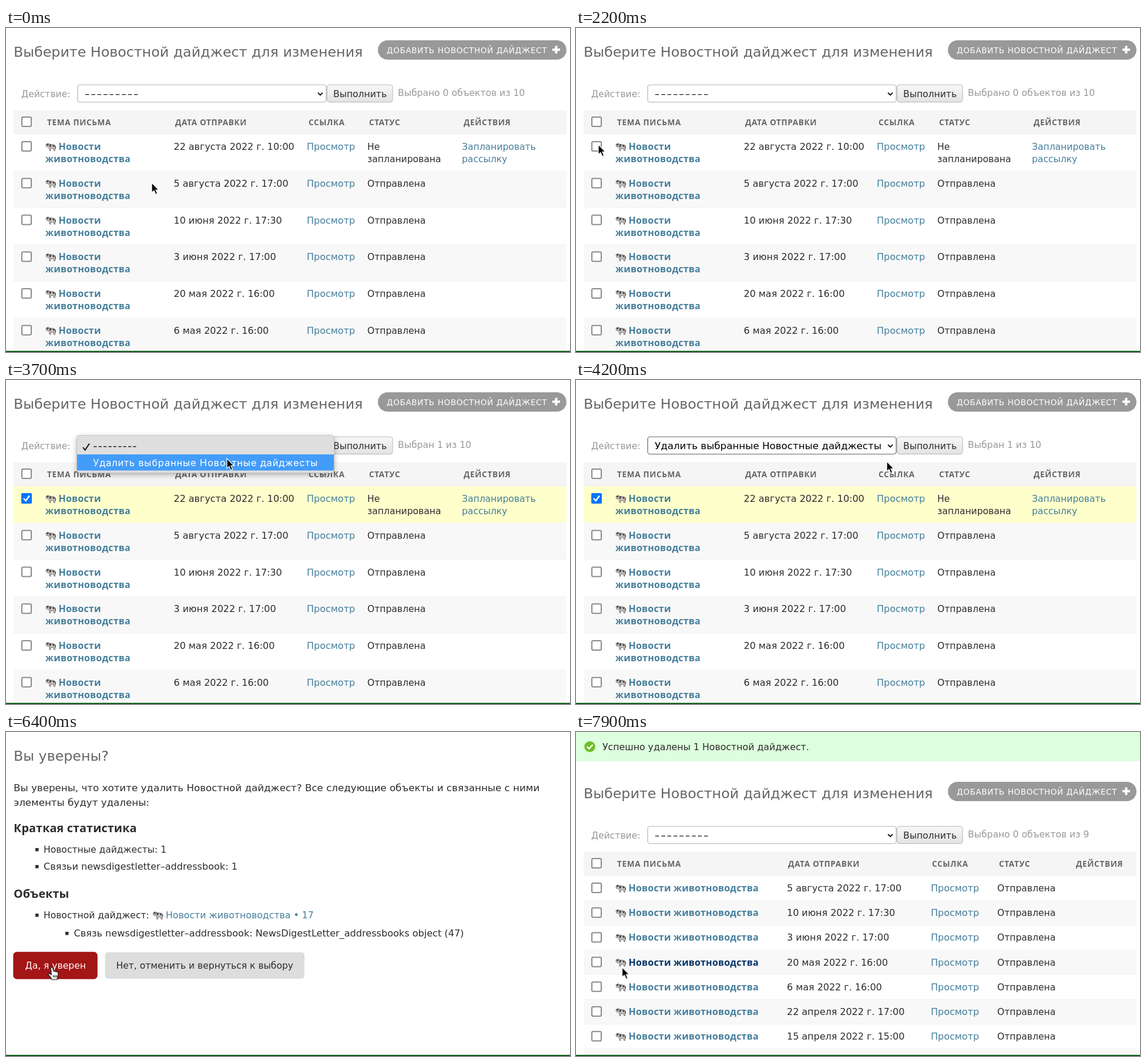
Recreate the animation shown at these times as an HTML page. Size 960 by 553 pixels, loop 8 s.

```html
<!DOCTYPE html>
<html lang="ru">
<head>
<meta charset="utf-8">
<title>Новостные дайджесты</title>
<style>
html, body { margin: 0; width: 100%; height: 100%; overflow: hidden; background: #fff; }
svg { display: block; width: 960px; height: 553px; }
text { font: 15.55px "DejaVu Sans", sans-serif; fill: #2c2c2c; white-space: pre; }
.title { font-size: 23.75px; fill: #666; }
.tool { font-size: 13.5px; letter-spacing: .65px; fill: #fff; }
.quiet { fill: #999; }
.field { font-size: 16.7px; fill: #000; }
.dashes { font-size: 16px; letter-spacing: 2.4px; fill: #000; }
.date { font-size: 15.95px; }
.view { font-size: 16px; fill: #447e9b; }
.link { fill: #447e9b; }
.note { font-size: 15.75px; }
.head { font: bold 13.5px "Noto Sans", sans-serif; letter-spacing: .7px; fill: #666; }
.name { font: bold 16px "Noto Sans", sans-serif; letter-spacing: .2px; fill: #447e9b; }
.name.hover { fill: #036; }
.sub { font: bold 19.7px "Noto Sans", sans-serif; letter-spacing: .17px; }
.para { font-size: 16.7px; }
.latin { font-size: 16.1px; }
.menu { font: 16.5px "Inter", sans-serif; letter-spacing: .8px; fill: #111; }
.light { fill: #fff; }
.box { fill: #fff; stroke: #8a8a90; stroke-width: 2; }
.tick { fill: none; stroke: #fff; stroke-width: 2.4; }

#list, #confirm, #result, .before, .after, #popup, .blank, .chosen, #arrow, #hand, #over {
  animation: 8s step-end infinite;
}
#list { animation-name: list; }
#confirm { animation-name: confirm; }
#result { animation-name: result; }
.before { animation-name: before; }
.after { animation-name: after; }
#popup { animation-name: popup; }
.blank { animation-name: blank; }
.chosen { animation-name: chosen; }
#arrow { animation-name: arrow; }
#hand, #over { animation-name: hover; }
#pointer { animation: move 8s ease-in-out infinite; }

@keyframes list { 0% { opacity: 1 } 61.25%, 100% { opacity: 0 } }
@keyframes confirm { 0% { opacity: 0 } 61.25% { opacity: 1 } 96.25%, 100% { opacity: 0 } }
@keyframes result { 0% { opacity: 0 } 96.25%, 100% { opacity: 1 } }
@keyframes before { 0% { opacity: 1 } 35%, 100% { opacity: 0 } }
@keyframes after { 0% { opacity: 0 } 35%, 100% { opacity: 1 } }
@keyframes popup { 0% { opacity: 0 } 43.75% { opacity: 1 } 48.75%, 100% { opacity: 0 } }
@keyframes blank { 0% { opacity: 1 } 48.75%, 100% { opacity: 0 } }
@keyframes chosen { 0% { opacity: 0 } 48.75%, 100% { opacity: 1 } }
@keyframes arrow { 0% { opacity: 1 } 78% { opacity: 0 } 96.25%, 100% { opacity: 1 } }
@keyframes hover { 0% { opacity: 0 } 78% { opacity: 1 } 96.25%, 100% { opacity: 0 } }
@keyframes move {
  0%, 16% { transform: translate(248px, 264px) }
  26.5%, 35% { transform: translate(38px, 199px) }
  42%, 43.5% { transform: translate(372px, 113px) }
  45.5%, 48.5% { transform: translate(376px, 134px) }
  52.5% { transform: translate(529px, 139px) }
  57%, 72.5% { transform: translate(600px, 109px) }
  79%, 100% { transform: translate(78.5px, 401.5px) }
}
</style>
</head>
<body>
<svg id="stage" viewBox="0 0 960 553">
  <defs>
    <linearGradient id="face" x2="0" y2="1">
      <stop stop-color="#f8f8f8"/><stop offset="1" stop-color="#e2e2e2"/>
    </linearGradient>
    <filter id="shade" x="-10%" y="-20%" width="120%" height="160%">
      <feDropShadow dx="0" dy="3" stdDeviation="4" flood-opacity=".28"/>
    </filter>
    <g id="cow">
      <path d="M.8 3.4 L3.8 1.8 L6.4 3.2 L14.4 4.4 Q16.2 5 16.2 7 L15.8 14.4 H14.2 L13.4 10.8 L8.8 10.4 L8.4 14.4 H6.8 L6 9.8 L4.4 7.4 L2.2 8.4 L.8 7 Z" fill="#c9c4c0" stroke="#5c5856" stroke-width=".8"/>
      <path d="M1.4 3.4 L4 2.6 L5.4 4.6 L3 6 Z M6.6 3.8 L9.6 4.2 L8.6 8 L6.4 7.8 Z M11.4 4.8 L14.6 5.2 L14.8 8 L12.4 7.6 Z" fill="#3c3a3a"/>
      <path d="M15.6 5.4 Q17.4 6.4 17 10.6" fill="none" stroke="#4b4848"/>
    </g>
  </defs>
  <g id="list"></g>
  <g id="confirm"></g>
  <g id="result"></g>
  <rect y="551" width="960" height="2" fill="#12601f"/>
  <g id="pointer">
    <path id="arrow" d="M0 0 V17 L3.9 13.4 L6.8 20 L9.7 18.7 L6.9 12.4 H12 Z" fill="#000" stroke="#fff" stroke-width="1.2"/>
    <path id="hand" d="M-2.5 1.2 Q-.5 -1.6 1.2 1.2 L2.6 7 Q4.6 5.4 5.6 7.4 Q7.4 6.2 8.2 8.2 Q10.4 7.4 10.6 10 L10 15.5 L8.6 21 H-.6 L-2.6 17.4 L-6.6 12.6 Q-6.4 9.6 -3.4 11.2 L-1.2 13 Z M2.4 13.5 V17.5 M5 13.5 V17.5 M7.6 13.5 V17.5" fill="#fff" stroke="#000" stroke-width="1.2" stroke-linejoin="round"/>
  </g>
</svg>
<script>
const text = (x, y, s, cls = '') => `<text x="${x}" y="${y}" class="${cls}">${s}</text>`;
const rect = (x, y, w, h, fill, more = '') =>
  `<rect x="${x}" y="${y}" width="${w}" height="${h}" fill="${fill}" ${more}/>`;
const group = (cls, ...parts) => `<g class="${cls}">${parts.join('')}</g>`;
const cow = (x, y) => `<use href="#cow" x="${x}" y="${y}"/>`;
const box = y => `<rect class="box" x="27" y="${y - 8}" width="16" height="16" rx="2"/>`;
const put = (id, ...parts) => document.getElementById(id).innerHTML = parts.join('');

const labels = ['ТЕМА ПИСЬМА', 'ДАТА ОТПРАВКИ', 'ССЫЛКА', 'СТАТУС', 'ДЕЙСТВИЯ'];
const dates = ['22 августа 2022 г. 10:00', '5 августа 2022 г. 17:00', '10 июня 2022 г. 17:30',
  '3 июня 2022 г. 17:00', '20 мая 2022 г. 16:00', '6 мая 2022 г. 16:00',
  '22 апреля 2022 г. 17:00', '15 апреля 2022 г. 15:00'];

const select = (stroke, value) =>
  rect(122, 97, 423, 29.5, '#fff', `rx="4" stroke="${stroke}" stroke-width="1.2"`) + value +
  '<path d="M531 110.5 L535 114.5 L539 110.5" fill="none" stroke="#111" stroke-width="1.8"/>';
const blank = select('#b4b4b4', text(134, 118, '–'.repeat(9), 'dashes'));

function header(columns) {
  return text(13, 49, 'Выберите Новостной дайджест для изменения', 'title') +
    rect(633, 21, 321, 33, '#999', 'rx="16.5"') +
    text(648, 43, 'ДОБАВИТЬ НОВОСТНОЙ ДАЙДЖЕСТ', 'tool') +
    '<path d="M930 37 H943 M936.5 30.5 V43.5" stroke="#fff" stroke-width="4"/>' +
    text(26, 118, 'Действие:', 'quiet') +
    rect(546.5, 97, 111.5, 29.5, 'url(#face)', 'rx="4" stroke="#b8b8b8"') +
    text(557, 118, 'Выполнить') +
    rect(13, 140, 941, 41, '#f5f5f5') + rect(13, 180.5, 941, 1, '#ebebeb') + box(160) +
    labels.map((s, i) => text(columns[i], 166, s, 'head')).join('');
}

function band(top, height, i) {
  return rect(13, top, 941, height, i % 2 ? '#f8f8f8' : '#fff') +
    rect(13, top + height - .5, 941, 1, '#ececec');
}

function tallRow(i) {
  const top = 181.5 + 62.75 * i, y = top + 26.5, first = i === 0;
  return band(top, 62.75, i) +
    (first ? group('after', rect(13, top, 941, 62, '#ffc')) : '') +
    box(top + 20.5) +
    (first ? group('after', rect(26, 193, 18, 18, '#0075ff', 'rx="2.5"'),
      '<path class="tick" d="M30 202 L33.7 206 L40 197.5"/>') : '') +
    cow(67.5, y - 13) + text(89.5, y, 'Новости', 'name') + text(67, y + 21, 'животноводства', 'name') +
    text(285.5, y, dates[i], 'date') + text(512, y, 'Просмотр', 'view') +
    (first ? text(615, y, 'Не') + text(615, y + 21, 'запланирована') +
      text(776, y, 'Запланировать', 'link') + text(776, y + 21, 'рассылку', 'link')
      : text(615, y, 'Отправлена'));
}

function shortRow(i) {
  const top = 245.5 + 42.2 * i, y = top + 26.5;
  return band(top, 42.2, i) + box(top + 20.5) + cow(67.5, y - 13) +
    text(89.5, y, 'Новости животноводства', i === 3 ? 'name hover' : 'name') +
    text(359, y, dates[i + 1], 'date') + text(604, y, 'Просмотр', 'view') + text(717, y, 'Отправлена');
}

put('list',
  header([70, 288, 515, 618, 779]),
  group('blank', blank),
  group('chosen', select('#666', text(134, 118, 'Удалить выбранные Новостные дайджесты', 'field'))),
  group('before', text(667, 116, 'Выбрано 0 объектов из 10', 'quiet')),
  group('after', text(667, 116, 'Выбран 1 из 10', 'quiet')),
  dates.slice(0, 6).map((_, i) => tallRow(i)).join(''),
  '<g id="popup">',
  rect(120.5, 94.5, 438, 64, '#dfdfdf', 'rx="5" stroke="#c4c4c4" filter="url(#shade)"'),
  rect(121, 127, 437, 27.5, '#429cfa'),
  '<path d="M131 115 L134.6 119.5 L142 108.5" fill="none" stroke="#111" stroke-width="2"/>',
  text(148, 119, '-'.repeat(9), 'menu'),
  text(148, 147, 'Удалить выбранные Новостные дайджесты', 'menu light'),
  '</g>');

const bullet = (x, y) => rect(x, y - 8, 5.5, 5.5, '#303030');
const relation = 'newsdigestletter–addressbook';
put('confirm',
  text(13, 49, 'Вы уверены?', 'title'),
  text(13, 101, 'Вы уверены, что хотите удалить Новостной дайджест? Все следующие объекты и связанные с ними', 'para'),
  text(13, 126, 'элементы будут удалены:', 'para'),
  text(13, 171, 'Краткая статистика', 'sub'),
  bullet(50, 206), text(64, 206, 'Новостные дайджесты: 1'),
  bullet(50, 235), text(64, 235, `Связьи ${relation}: 1`, 'latin'),
  text(13, 283, 'Объекты', 'sub'),
  bullet(50, 318), text(64, 318, 'Новостной дайджест:'), cow(250, 305),
  text(272, 318, 'Новости животноводства • 17', 'note link'),
  bullet(101, 349),
  text(115.5, 349, `Связь ${relation}: NewsDigestLetter_addressbooks object (47)`, 'latin'),
  rect(13, 376, 142, 45, '#ba2121', 'rx="5" stroke="#ab1c1c"'),
  rect(13, 376, 142, 45, '#a41515', 'rx="5" stroke="#961212" id="over"'),
  text(32.5, 404, 'Да, я уверен', 'light'),
  rect(168.5, 376, 339.5, 45, '#ddd', 'rx="5"'),
  text(187.5, 404, 'Нет, отменить и вернуться к выбору'));

put('result',
  rect(0, 0, 960, 50, '#dfd'),
  '<circle cx="23.5" cy="25" r="9.3" fill="#70bf2b"/><path class="tick" d="M18.8 25 L22.3 28.5 L28.5 21.8"/>',
  text(45, 31, 'Успешно удалены 1 Новостной дайджест.', 'note'),
  '<g transform="translate(0 64)">',
  header([70, 361, 606, 720, 851]), blank,
  text(667, 116, 'Выбрано 0 объектов из 9', 'quiet'),
  '</g>',
  dates.slice(1).map((_, i) => shortRow(i)).join(''),
  band(540.9, 42, 7));
</script>
</body>
</html>
```
